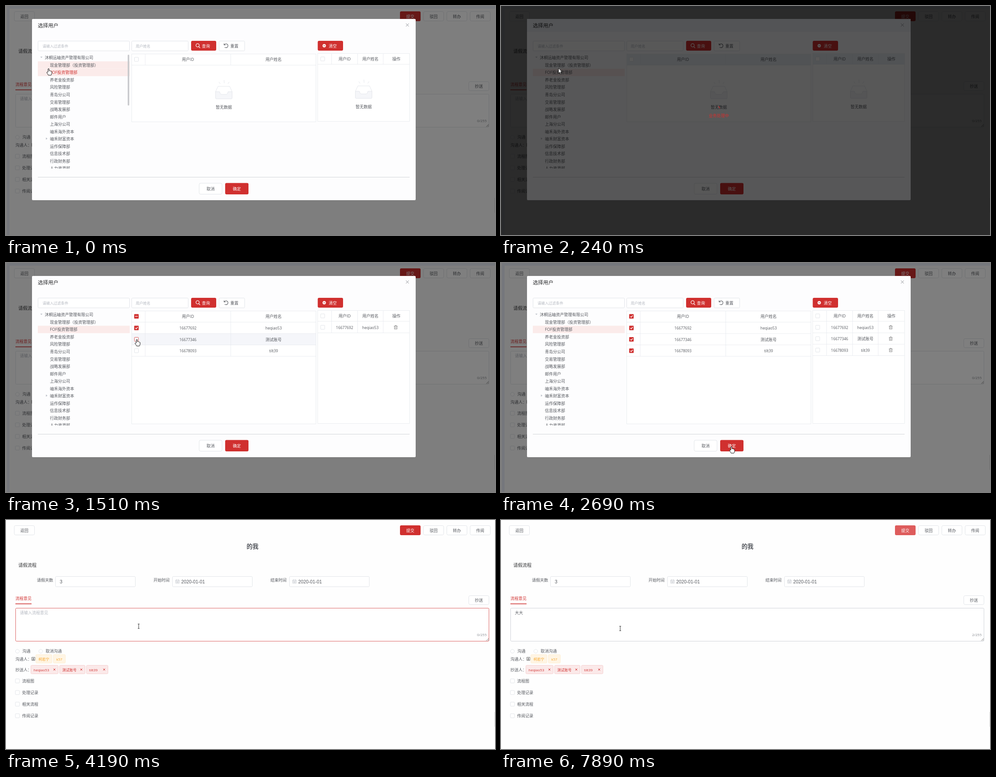
An HTML page that plays this animation: 1091x513 px, repeating every 8000 ms.

```html
<!DOCTYPE html>
<html lang="zh">
<head>
<meta charset="utf-8">
<title>选择用户</title>
<style>
html, body { margin: 0; width: 100%; height: 100%; overflow: hidden; background: #fefefe; }
svg { display: block; width: 100%; height: 100%; }
text { font: 9px "Open Sans", "Noto Sans CJK SC", "Noto Sans CJK", sans-serif; fill: #55585e; dominant-baseline: central; }
.mid { text-anchor: middle; }
.dark { fill: #303133; }
.white { fill: #fff; }
.red { fill: #d0302f; }
.orange { fill: #f7a52a; }
.hint { font-size: 8.2px; fill: #b4b8c0; }
.prompt { fill: #b4b8c0; }
.tag { font-size: 8px; }
.id { font-size: 8.4px; }
.count { font-size: 8px; fill: #85888e; }
.date { font: 10.3px "Liberation Sans", Arial, sans-serif; }
.title { font-size: 11.5px; }
.section { font-size: 10.2px; font-weight: 500; }
.heading { font-size: 13.3px; font-weight: 700; }
#fund text { fill: inherit; }
</style>
</head>
<body>
<svg id="stage" viewBox="0 0 1091 513"></svg>
<style id="motion"></style>
<script>
const LOOP = 8000, RED = '#d0302f', EDGE = '#d9dce2', GRID = '#e4e7ec', HAIR = .75;

// Drawing helpers
const text = (x, y, s, cls = '') => `<text x="${x}" y="${y}" class="${cls}">${s}</text>`;
const mid = (x, y, s, cls = '') => text(x, y, s, 'mid ' + cls);
const rect = (x, y, w, h, fill = '#fff', stroke = 'none', r = 0, more = '') =>
  `<rect x="${x}" y="${y}" width="${w}" height="${h}" rx="${r}" fill="${fill}" stroke="${stroke}" stroke-width="${HAIR}" ${more}/>`;
const path = (d, stroke, width = 1, fill = 'none') =>
  `<path d="${d}" fill="${fill}" stroke="${stroke}" stroke-width="${width}"/>`;
const group = (id, ...parts) => `<g id="${id}">${parts.join('')}</g>`;
const at = (x, y, s) => `<g transform="translate(${x} ${y})">${s}</g>`;
const cross = (x, y, r, color) =>
  path(`M${x - r} ${y - r}l${2 * r} ${2 * r}m0 ${-2 * r}l${-2 * r} ${2 * r}`, color);
const button = (x, y, w, h, label, main = false) =>
  (main ? rect(x, y, w, h, RED, 'none', 3) : rect(x + .5, y + .5, w - 1, h - 1, '#fff', EDGE, 3)) +
  mid(x + w / 2, y + h / 2, label, main ? 'white' : '');
const check = (x, y, color = EDGE) => rect(x - 4.5, y - 4.5, 9, 9, '#fff', color, 1);
const ticked = (x, y, mark = 'M-2.5 0l2 2 3.5-4') =>
  at(x, y, rect(-5, -5, 10, 10, RED, 'none', 1) + path(mark, '#fff', 1.3));
const input = (x, y, w, h) => rect(x + .5, y + .5, w - 1, h - 1, '#fff', EDGE, 2);

// Motion helpers: every track holds its value until the next key
const sheet = [];
function track(id, keys) {
  const frames = keys.map(([t, css]) => `${t / LOOP * 100}% { ${css} }`).join(' ');
  sheet.push(`@keyframes ${id} { ${frames} } #${id} { animation: ${id} ${LOOP}ms step-end infinite; }`);
}
const fade = (id, keys) => track(id, keys.map(([t, o]) => [t, `opacity: ${o}`]));
const show = (id, from, to = LOOP) =>
  fade(id, [...(from ? [[0, 0]] : []), [from, 1], [to, to < LOOP ? 0 : 1]]);

// Invented people
const users = [['16677692', 'heqiao53'], ['16677346', '测试账号'], ['16678093', 'tilt39']];

// Page
const calendar = (x, y) => at(x, y,
  path('M.5 1.5h8v7h-8zM.5 3.8h8M2.5 0v2.5M6.5 0v2.5M2 5.5h5M2 7h5', '#b9bdc5', .7));
const dateField = (x, label) => text(x, 134, label) + input(x + 42, 126, 179, 24) +
  calendar(x + 49, 133) + text(x + 62, 138, '2020-01-01', 'date');
const orangeTag = (x, w, label) => rect(x + .5, 301.5, w - 1, 19, '#fff5e4', '#fdebcd', 2) +
  mid(x + w / 2, 311.5, label, 'tag orange');
const redTag = (x, w, label) => rect(x + .5, 325.5, w - 1, 19, '#fbe9e9', '#f2c6c6', 2) +
  text(x + 6.5, 335.5, label, 'tag red') + cross(x + w - 9, 335, 2.2, RED);
const radio = (x, label) =>
  `<circle cx="${x}" cy="294" r="4.2" fill="#fff" stroke="${EDGE}" stroke-width="${HAIR}"/>` +
  text(x + 11, 293.5, label);

const page = [
  rect(0, 0, 1091, 513, '#fefefe'),
  group('strip', rect(2, 0, 1089, 513, '#ebf0fa')),
  rect(8, 6, 1083, 507, '#fefefe'),
  button(18, 12, 46, 22, '返回'),
  rect(879, 12, 46, 22, RED, 'none', 3, 'id="submit"'), mid(902, 23, '提交', 'white'),
  ...['驳回', '转办', '传阅'].map((s, i) => button(931 + 52 * i, 12, 46, 22, s)),
  mid(550, 58.7, '的我', 'heading'),
  text(27.5, 100.5, '请假流程', 'section dark'),
  text(69, 134, '请假天数'), input(110, 126, 179, 24), text(120, 138, '3', 'date'),
  dateField(329, '开始时间'), dateField(590, '结束时间'),
  text(21, 175.5, '流程意见', 'red'), rect(21, 187, 36, 1.5, RED),
  button(1032, 169, 46, 21, '抄送'),
  rect(21.5, 197.5, 1056, 74, '#fff', EDGE, 2, 'id="area"'),
  path('M1071.5 270.5l5.5-5.5M1074.5 270.5l2.5-2.5', '#777', .9),
  group('empty', text(31, 207.5, '请输入流程意见', 'prompt'), text(1051, 256, '0/255', 'count')),
  group('one', text(31, 207.5, '大'), text(1051, 256, '1/255', 'count')),
  group('two', text(31, 207.5, '大大'), text(1051, 256, '2/255', 'count')),
  radio(25.5, '沟通'), radio(77.5, '取消沟通'),
  text(21, 311.5, '沟通人：'),
  at(57, 307, path('M.5.5h7v7h-7zM2 6q2-3 4 0zM3 2.5h2v1.5h-2z', '#666', .9)),
  orangeTag(66, 37, '柯若宁'), orangeTag(105, 28, 'k57'),
  group('copied', text(21, 335.5, '抄送人：'),
    redTag(55, 62, users[0][1]), redTag(119, 58, users[1][1]), redTag(179, 49, users[2][1])),
  group('records', ...['流程图', '处理记录', '相关流程', '传阅记录'].map((s, i) =>
    check(25.5, 360.5 + 26 * i) + text(36, 360 + 26 * i, s))),
  rect(1090, 430, 1, 33, '#ddd'),
];

// Dialog
const departments = ['现金管理部（投资管理部）', 'FOF投资管理部', '养老金投资部', '风险管理部', '青岛分公司',
  '交易管理部', '战略发展部', '邮件用户', '上海分公司', '岫禾海外资本', '岫禾财富资本', '运作保障部',
  '信息技术部', '行政财务部', '人力资源部'];
const treeY = i => 132.3 + 16.54 * i;
const treeRow = i => rect(71, treeY(i) - 8.3, 205, 16.6, '#fbebea');
const tree = [
  group('pressed', treeRow(0)), group('chosen', treeRow(1)),
  path('M76.5 113.5h5l-2.5 3z', 'none', 0, '#c0c4cc'),
  text(86.5, 115.8, '沐桐远岫资产管理有限公司'),
  ...departments.map((s, i) => i === 1 ? group('fund', text(98, treeY(i), s)) : text(98, treeY(i), s)),
  path('M89 294.5v5l3.5-2.5z', 'none', 0, '#c0c4cc'),
  group('thumb', rect(271.5, 109, 3.5, 114, '#c9cacd', 'none', 1.7)),
];
const tray = (x, y) => at(x, y,
  path('M-18.5 12h9q1 6 4 6h11q3 0 4-6h9v14q0 2-2 2h-33q-2 0-2-2z', '#dcdfe6', HAIR, '#f5f6f9') +
  path('M-18.5 12l5.5-12h26l5.5 12M-11-10l3 4.5M.5-14l.5 7M12-10l-3 4.5', '#dcdfe6', HAIR)) +
  mid(x, y + 46.5, '暂无数据');
const minus = 'M-3 0h6';

const leftY = i => 145.5 + 25.5 * i, rightY = i => 144 + 25.5 * i;
const columns = (xs, y1, y2) => path(xs.map(x => `M${x}.5 ${y1}V${y2}`).join(''), GRID, HAIR);
const rule = (x1, x2, y) => path(`M${x1} ${y}H${x2}`, GRID, HAIR);
const leftTable = [
  group('leftShort', rect(280.5, 107.5, 411, 152, '#fff', GRID), tray(486, 180)),
  group('leftTall', rect(280.5, 107.5, 411, 253, '#fff', GRID),
    ...['A', 'B', 'C'].map((row, i) => group('hover' + row, rect(281, 132.5 + 25.5 * i, 410, 25.5, '#f5f6fa'))),
    ...users.map(([id, name], i) => check(291, leftY(i)) + mid(406, leftY(i), id, 'id') +
      mid(597, leftY(i), name, i === 1 ? '' : 'id') + rule(280, 692, 158 + 25.5 * i)),
    columns([310, 501], 132, 209)),
  group('leftTint', rect(281, 108, 410, 24, '#ebf0f6')),
  rule(280, 692, 132.5), columns([310, 501], 108, 132),
  check(291, 119.5), mid(406, 119.5, '用户ID'), mid(597, 119.5, '用户姓名'),
  ...['A', 'B', 'C'].map((row, i) => group('hot' + row, check(291, leftY(i), RED))),
  group('some', ticked(291, 119.5, minus)), group('all', ticked(291, 119.5)),
  ...users.map((_, i) => group('tick' + i, ticked(291, leftY(i)))),
];
const bin = (x, y) => at(x, y, path('M-4-2.5h8M-1.5-2.5v-1.5h3v1.5M-3-2.5v6.5h6v-6.5M-1-.5v3M1-.5v3', '#777', .8));
const rightTable = [
  group('rightShort', rect(695.5, 106.5, 205, 152, '#fff', GRID), tray(798, 179)),
  group('rightTall', rect(695.5, 106.5, 205, 253, '#fff', GRID)),
  group('rightTint', rect(696, 107, 204, 24, '#ebf0f6')),
  rule(695, 900, 130.5), columns([726, 784, 841], 107, 131),
  check(706.5, 118.5), mid(755.5, 118.5, '用户ID'), mid(813, 118.5, '用户姓名'), mid(871, 118.5, '操作'),
  ...users.map(([id, name], i) => group('added' + i,
    check(706.5, rightY(i)), mid(755.5, rightY(i), id, 'id'), mid(813, rightY(i), name, i === 1 ? '' : 'id'),
    bin(869.5, rightY(i)), rule(695, 900, 156.5 + 25.5 * i),
    columns([726, 784, 841], 131 + 25.5 * i, 156.5 + 25.5 * i))),
];
const redTool = (x, w, label, textX) => rect(x, 78, w, 22, RED, 'none', 3) + text(textX, 89.3, label, 'white');
const dialog = group('dialog',
  rect(58, 29, 856, 406, '#fdfdfe', 'none', 2),
  group('titleTint', rect(58, 29, 856, 29, '#f1f4f9')),
  text(71, 43.8, '选择用户', 'title dark'), cross(895.5, 42.5, 3.2, '#85888e'),
  input(71, 78, 205, 23), text(81.5, 89, '请输入过滤条件', 'hint'),
  input(280, 78, 127, 23), text(289.5, 89, '用户姓名', 'hint'),
  redTool(413, 56, '查询', 437), '<circle cx="427.5" cy="88" r="3.7" fill="none" stroke="#fff" stroke-width="1.2"/>',
  path('M430 91l3 3', '#fff', 1.3),
  input(475, 78, 58, 23), path('M487.5 86.5a4.3 4.3 0 1 1 .3 5.5M486.5 84v3.3h3.3', '#55585e', 1.1), text(500.5, 89.3, '重置'),
  redTool(695.5, 56.5, '清空', 720), '<circle cx="710" cy="89" r="3.7" fill="#fff"/>', path('M708 89h4', RED, 1.1),
  `<g clip-path="url(#treeClip)">${tree.join('')}</g>`,
  ...leftTable, ...rightTable,
  path('M71 383.5H900.5', '#c6c8cb', HAIR),
  button(430.5, 396.5, 52, 25.5, '取消'), button(489, 396.5, 52, 25.5, '确定', true));

const loading = group('loading',
  rect(0, 0, 1091, 513, '#000', 'none', 0, 'opacity=".655"'),
  path('M484.5 225.5q3-1 3.5 4', RED, 1.2), mid(486, 245.5, '业务处理中', 'red'));

const pointer = group('pointer',
  group('arrow', path('M.3.3V11.6L2.9 9.2 4.7 13 6.4 12.2 4.7 8.6H8z', '#111', .9, '#fff')),
  group('hand', path('M-1.2 8V1Q0-.6 1.2 1V5.2Q2.8 4.2 3.6 5.6 5 5 5.6 6.3 7.2 6 7.2 8V10.6Q7 13 5.6 15H-.6Q-1.5 12.4-4 9.6-4.2 7.4-2.4 8z', '#111', 1, '#fff')),
  group('beam', path('M-2-5H2M0-5V5M-2 5H2', '#333', 1)));

document.getElementById('stage').innerHTML =
  '<clipPath id="treeClip"><rect x="71" y="105" width="206" height="259"/></clipPath>' +
  page.join('') + group('shade', rect(0, 0, 1091, 513, '#000')) + dialog + loading + pointer;

// Timeline
const LOADED = 390, PICK = [1090, 1630, 1900], CLOSE = 2840;
fade('loading', [[0, 0], [120, .35], [240, 1], [390, .6], [510, .16], [660, 0]]);
fade('shade', [[0, .5], [CLOSE, .42], [2960, .2], [3080, .02], [3230, 0]]);
track('dialog', [[0, 1, 0], [CLOSE, .9, -1], [2960, .6, -5], [3080, .2, -10], [3230, 0, -20]]
  .map(([t, o, y]) => [t, `opacity: ${o}; transform: translateY(${y}px)`]));
track('fund', [[0, `fill: ${RED}`], [240, 'fill: #55585e']]);
track('records', [[0, 'transform: translateY(-24px)'], [CLOSE, 'transform: none']]);
track('area', [[0, EDGE], [4040, RED], [5540, EDGE], [7470, '#c0c4cc']].map(([t, c]) => [t, `stroke: ${c}`]));
track('submit', [[0, RED], [5540, '#d85151'], [7080, '#de5c5c']].map(([t, c]) => [t, `fill: ${c}`]));
for (const id of ['titleTint', 'leftTint', 'rightTint']) show(id, 240, 660);
for (const [id, from] of [['leftShort', LOADED], ['rightShort', PICK[0]]])
  fade(id, [[0, 1], [from, 0], [CLOSE, 1]]);
show('leftTall', LOADED, CLOSE);
show('rightTall', PICK[0], CLOSE);
PICK.forEach((t, i) => { show('tick' + i, t, CLOSE); show('added' + i, t, CLOSE); });
show('some', PICK[0], PICK[2]);
show('all', PICK[2], CLOSE);
for (const [row, from, to] of [['A', 810, 1360], ['B', 1360, 1780], ['C', 1780, 2180]]) {
  show('hover' + row, from, to);
  show('hot' + row, from, to);
}
show('pressed', 0, 240);
show('thumb', 0, 240);
show('chosen', 0, CLOSE);
show('strip', 0, 3230);
show('copied', CLOSE);
show('empty', 0, 4340);
show('one', 4340, 4730);
show('two', 4730);

const moves = [
  ['hand', [0, 95, 140], [120, 100, 140]],
  ['arrow', [240, 128, 139], [390, 188, 137], [510, 247, 135], [660, 274, 140]],
  ['hand', [810, 288, 145], [930, 290, 146], [1210, 291, 152], [1360, 291, 166], [1510, 292, 171],
    [1780, 292, 197], [1900, 292, 200]],
  ['arrow', [2180, 312, 225], [2300, 372, 290], [2450, 446, 362]],
  ['hand', [2570, 498, 402], [2690, 514, 411]],
  ['arrow', [2960, 514, 418], [3080, 514, 421], [3230, 505, 405], [3360, 470, 370], [3480, 420, 330], [3630, 360, 290]],
  ['beam', [3750, 320, 262], [3900, 300, 245], [4040, 296, 238], [4880, 330, 232], [5000, 460, 207]],
  ['arrow', [5120, 620, 140], [5270, 800, 58], [5390, 862, 36]],
  ['hand', [5540, 895, 24], [5690, 901, 22], [6930, 898, 25]],
  ['arrow', [7080, 850, 48], [7200, 740, 95], [7350, 600, 145]],
  ['beam', [7470, 470, 205], [7620, 360, 228], [7740, 290, 240], [7890, 266, 243]],
];
track('pointer', moves.flatMap(([, ...keys]) => keys)
  .map(([t, x, y]) => [t, `transform: translate(${x}px, ${y}px)`]));
for (const kind of ['arrow', 'hand', 'beam'])
  fade(kind, moves.map(([name, [t]]) => [t, +(name === kind)]));

document.getElementById('motion').textContent = sheet.join('\n');
</script>
</body>
</html>
```
